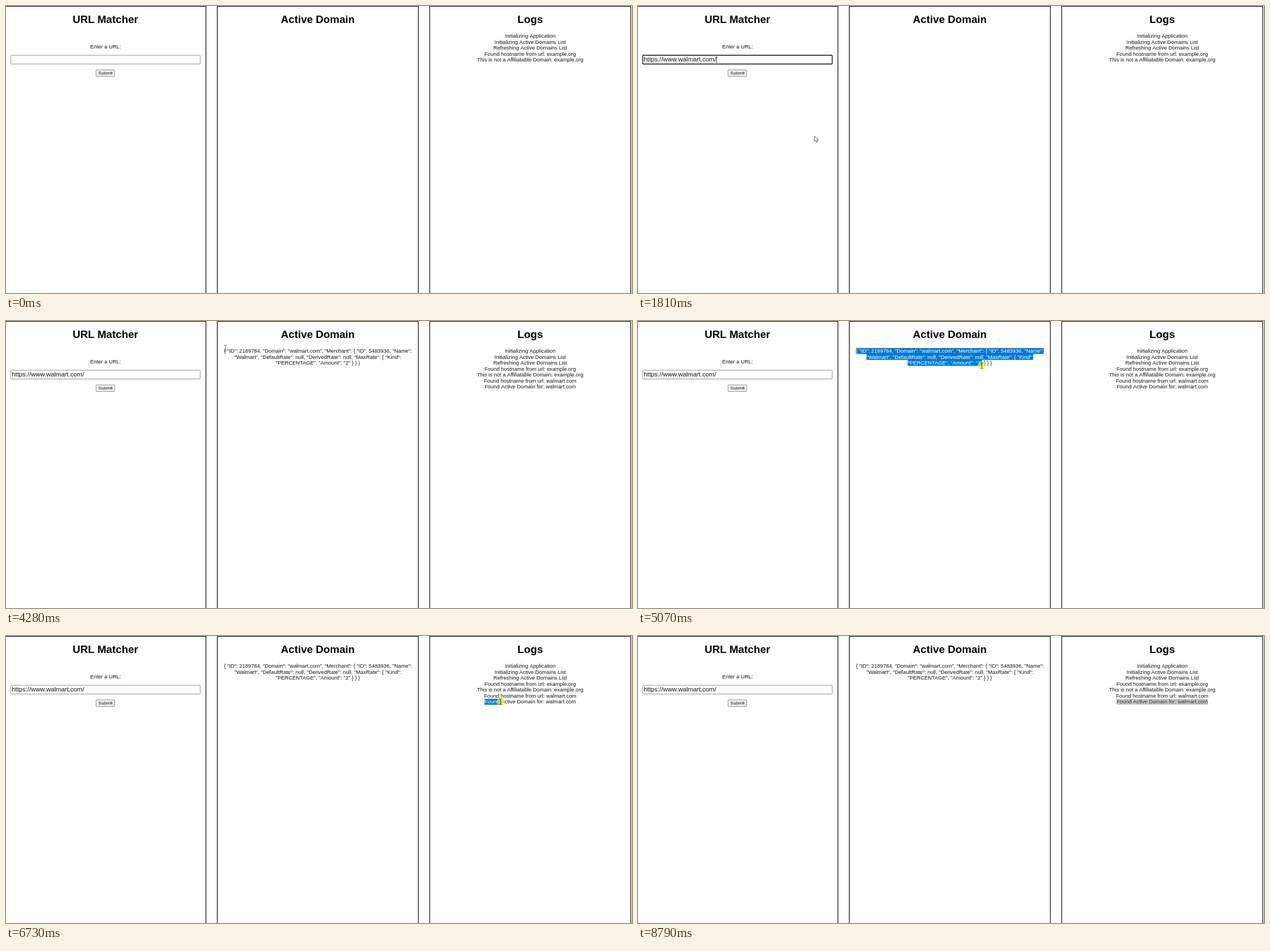
An HTML page with a canvas for the animation above (8.87 s loop, 1104 by 507 pixels).

```html
<!DOCTYPE html>
<html lang="en">
<head>
<meta charset="utf-8">
<title>URL Matcher</title>
<style>
  html, body { margin: 0; width: 100%; height: 100%; overflow: hidden; background: #fff; }
  canvas { display: block; width: 1104px; height: 507px; }
</style>
</head>
<body>
<canvas id="stage" width="1104" height="507"></canvas>
<script>
const ctx = document.getElementById('stage').getContext('2d');
const LOOP = 8870;
const ZOOM = 0.586; // the page is shown smaller than its CSS sizes
const LINE_TOP = 47.7, LINE_HEIGHT = 18 * ZOOM;
const INK = '#141414';
const font = (size, weight = '') =>
  `${weight} ${size * ZOOM}px "Liberation Sans", Arial, sans-serif`;
const BODY = font(16);

const DOMAIN = {
  center: 550,
  lines: [
    '{ "ID": 2189784, "Domain": "walmart.com", "Merchant": { "ID": 5483936, "Name":',
    '"Walmart", "DefaultRate": null, "DerivedRate": null, "MaxRate": { "Kind":',
    '"PERCENTAGE", "Amount": "2" } } }'
  ]
};
const LOGS = {
  center: 924.5,
  lines: [
    'Initializing Application',
    'Initializing Active Domains List',
    'Refreshing Active Domains List',
    'Found hostname from url: example.org',
    'This is not a Affiliatable Domain: example.org',
    'Found hostname from url: walmart.com',
    'Found Active Domain for: walmart.com'
  ]
};

const TIME = {
  enter: 70, focus: 1260, paste: 1650, submit: 2930, dragDomain: 4680,
  deselect: 5780, dragLog: 6490, release: 7830, exit: 8480, blur: 8790
};

// The pointer rests between moves; bow bends a move sideways.
const START = { x: 1014, y: 497 };
const MOVES = [
  { leave: TIME.enter, arrive: 1170, x: 313, y: 90 },
  { leave: 1420, arrive: 1890, x: 299, y: 240, bow: -48 },
  { leave: 1970, arrive: 2700, x: 179, y: 122 },
  { leave: 3010, arrive: 4280, x: 387, y: 48, bow: 150 },
  { leave: TIME.dragDomain, arrive: 5310, x: 711, y: 93, held: true },
  { leave: 5480, arrive: TIME.deselect, x: 812, y: 160 },
  { leave: 5930, arrive: 6410, x: 841, y: 117 },
  { leave: TIME.dragLog, arrive: 7360, x: 1009, y: 110.7, held: true },
  { leave: 7440, arrive: 7530, x: 1034, y: 126, held: true },
  { leave: TIME.release, arrive: TIME.exit, x: 1094, y: 460 }
];

const smooth = u => u * u * (3 - 2 * u);
const during = (t, from, to) => t >= from && t < to;
const inside = (p, x, y, w, h) => p.x >= x && p.x <= x + w && p.y >= y && p.y <= y + h;

function pointerAt(t) {
  const i = MOVES.findLastIndex(move => t >= move.leave);
  if (i < 0) return START;
  const from = MOVES[i - 1] || START, to = MOVES[i];
  const u = smooth(Math.min(1, (t - to.leave) / (to.arrive - to.leave)));
  const dx = to.x - from.x, dy = to.y - from.y;
  const side = (to.bow || 0) * Math.sin(Math.PI * u) / Math.hypot(dx, dy);
  const clicking = during(t, TIME.focus, 1420) || during(t, TIME.deselect, 5930);
  return {
    x: from.x + dx * u - dy * side,
    y: from.y + dy * u + dx * side,
    pressed: to.held || clicking
  };
}

function text(str, x, y, face = BODY, color = INK, align = 'center') {
  ctx.font = face;
  ctx.textAlign = align;
  ctx.fillStyle = color;
  ctx.fillText(str, x, y);
}

function box(x, y, w, h, fill, stroke, lineWidth) {
  ctx.beginPath();
  ctx.roundRect(x, y, w, h, 1.3);
  ctx.fillStyle = fill;
  ctx.fill();
  ctx.strokeStyle = stroke;
  ctx.lineWidth = lineWidth;
  ctx.stroke();
}

const lineY = i => LINE_TOP + i * LINE_HEIGHT;

function bounds({ lines, center }, i) {
  ctx.font = BODY;
  const half = ctx.measureText(lines[i]).width / 2;
  return [center - half, center + half];
}

// Text position (line, x of a letter gap) nearest to a point.
function caretAt(block, p) {
  const last = block.lines.length - 1;
  const row = Math.floor((p.y - LINE_TOP) / LINE_HEIGHT);
  if (row > last) return { line: last, x: bounds(block, last)[1] };
  const line = Math.max(0, row), str = block.lines[line], left = bounds(block, line)[0];
  let x = left;
  for (let n = 1; n <= str.length; n++) {
    const gap = left + ctx.measureText(str.slice(0, n)).width;
    if (Math.abs(gap - p.x) < Math.abs(x - p.x)) x = gap;
  }
  return { line, x };
}

function paragraph({ lines, center }, color) {
  lines.forEach((str, i) => text(str, center, lineY(i) + 8.5, BODY, color));
}

// Highlights from the start of a line to the point, in either direction.
function select(block, startLine, point, back, front, breakWidth = 0) {
  const anchor = { line: startLine, x: bounds(block, startLine)[0] };
  const focus = caretAt(block, point);
  const [a, b] = focus.line < startLine ? [focus, anchor] : [anchor, focus];
  ctx.save();
  ctx.beginPath();
  for (let i = a.line; i <= b.line; i++) {
    const [left, right] = bounds(block, i);
    const from = i === a.line ? a.x : left;
    const to = i === b.line ? b.x : right + breakWidth;
    ctx.rect(from, lineY(i), to - from, LINE_HEIGHT);
  }
  ctx.fillStyle = back;
  ctx.fill();
  ctx.clip();
  paragraph(block, front);
  ctx.restore();
}

const ARROW = new Path2D('M0 0V9.6L2.2 7.6 3.7 10.9 5.2 10.2 3.8 7H6.8Z');
const BEAM = new Path2D('M-2.5 -5H-.6L0 -4.5.6 -5H2.5M0 -4.5V4.5M-2.5 5H-.6L0 4.5.6 5H2.5');

function drawPointer(p, beam) {
  if (p.pressed) {
    ctx.beginPath();
    ctx.arc(p.x, p.y, 7.2, 0, 2 * Math.PI);
    ctx.fillStyle = 'rgba(255,255,0,.55)';
    ctx.fill();
  }
  ctx.save();
  ctx.translate(p.x, p.y);
  ctx.lineWidth = 0.8;
  ctx.strokeStyle = '#333';
  ctx.fillStyle = '#fff';
  if (!beam) ctx.fill(ARROW);
  ctx.stroke(beam ? BEAM : ARROW);
  ctx.restore();
}

function panels() {
  ctx.fillStyle = '#fff';
  ctx.fillRect(0, 0, 1104, 507);
  ctx.strokeStyle = '#000';
  ctx.lineWidth = 2 * ZOOM;
  ['URL Matcher', 'Active Domain', 'Logs'].forEach((title, i) => {
    const center = 175.3 + i * 374.6;
    ctx.strokeRect(center - 177.3, 0.5, 354.6, 520);
    text(title, center, 30.4, font(32, 'bold'), '#000');
  });
}

function form(t, p) {
  const focused = during(t, TIME.focus, TIME.submit), pasted = t >= TIME.paste;
  const border = hovered => hovered ? '#4f4f4f' : '#767676';
  const onInput = inside(p, 8, 86, 335, 17);
  const onButton = inside(p, 158, 112, 34, 13);

  text('Enter a URL:', 175.5, 75.1);
  box(8.5, 87, 334, 15.5, '#fff', focused ? '#101010' : border(onInput), focused ? 1.4 : 0.8);
  if (pasted) text('https://www.walmart.com/', 10.3, 98.4, font(19.2), INK, 'left');
  const blink = (t - (pasted ? TIME.paste : TIME.focus)) % 1000;
  if (focused && blink < 500) {
    ctx.fillStyle = '#000';
    ctx.fillRect(pasted ? 138 : 10.3, 89, 0.8, 11.5);
  }
  box(158.8, 112.8, 33, 11.6, onButton ? '#e5e5e5' : '#efefef', border(onButton), 0.8);
  text('Submit', 175.4, 121.3, font(13.8));
  return onInput;
}

function draw(t) {
  const shown = during(t, TIME.enter, TIME.exit);
  const p = shown ? pointerAt(t) : { x: -99, y: -99 };
  const submitted = t >= TIME.submit;
  const blocks = submitted ? [DOMAIN, LOGS] : [{ ...LOGS, lines: LOGS.lines.slice(0, 5) }];

  panels();
  const onInput = form(t, p);
  blocks.forEach(block => paragraph(block));

  if (during(t, TIME.dragDomain, TIME.deselect)) {
    select(DOMAIN, 0, pointerAt(Math.min(t, 5480)), '#0078d7', '#fff');
  }
  if (t >= TIME.dragLog) {
    const colors = t < TIME.blur ? ['#0078d7', '#fff'] : ['#c8c8c8', '#323232'];
    select(LOGS, 6, pointerAt(Math.min(t, TIME.release)), ...colors, 2.6);
  }

  if (shown) {
    const overText = blocks.some(block => block.lines.some((_, i) => {
      const [left, right] = bounds(block, i);
      return inside(p, left, lineY(i), right - left, LINE_HEIGHT);
    }));
    drawPointer(p, onInput || overText);
  }
}

const begin = performance.now();
function tick() {
  draw((performance.now() - begin) % LOOP);
  requestAnimationFrame(tick);
}
tick();
</script>
</body>
</html>
```
